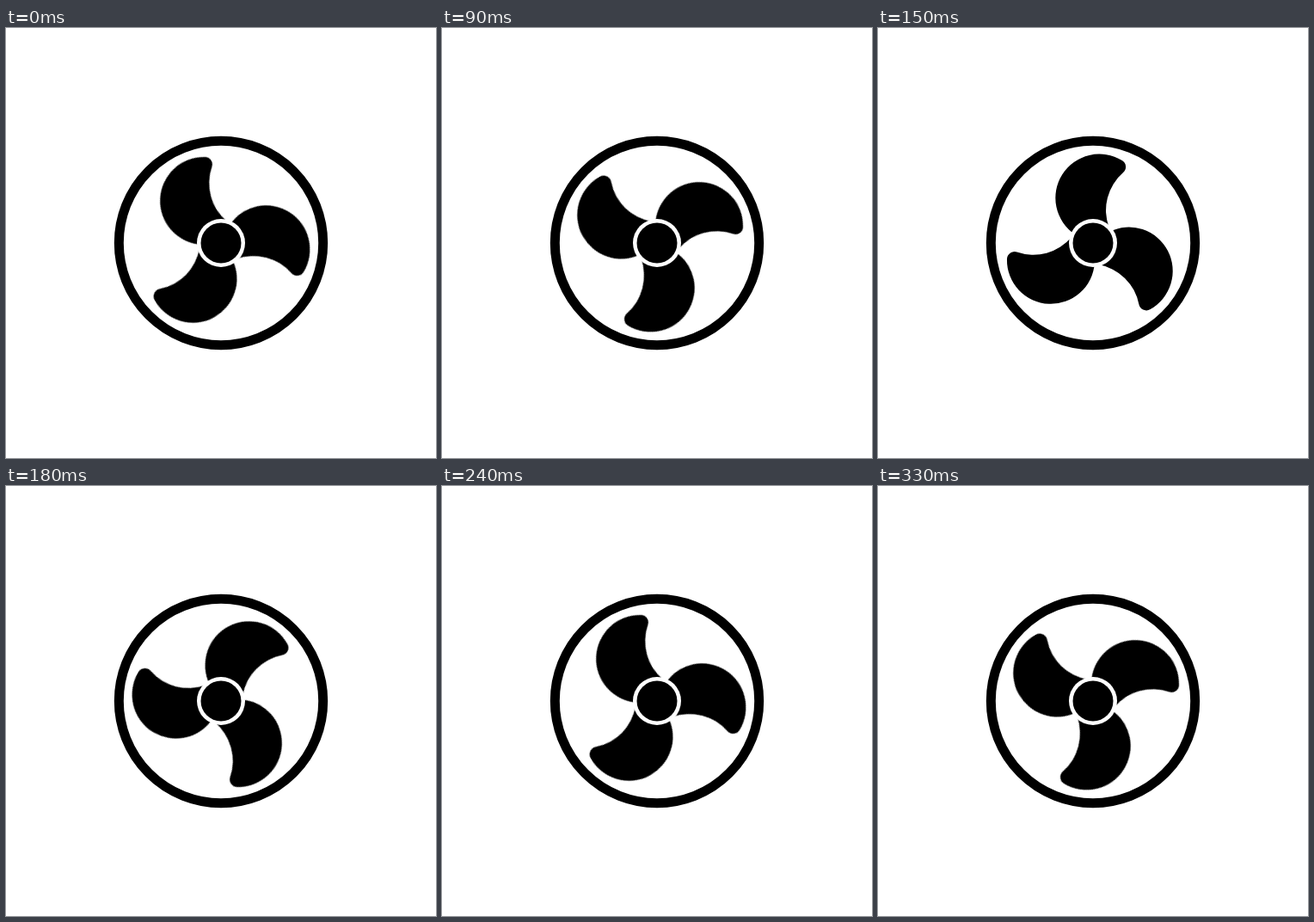
Write an HTML page that moves like this. It is 500 px wide and 500 px high and loops after 0.36 s.

```html
<!DOCTYPE html>
<html lang="en">
<head>
<meta charset="utf-8">
<title>Fan</title>
<style>
  html, body { margin: 0; width: 100%; height: 100%; overflow: hidden; background: #fff; }
  svg { display: block; width: 100%; height: 100%; }
  /* Three-fold symmetry: a third of a turn in four hard steps looks like endless spin. */
  .blades { transform-origin: 0 0; animation: spin 120ms steps(4, end) infinite; }
  @keyframes spin {
    from { transform: rotate(-30deg); }
    to { transform: rotate(90deg); }
  }
</style>
</head>
<body>
<svg viewBox="-250 -250 500 500">
  <defs>
    <path id="blade" d="M-21 -10A51 51 0 0 1 33.8 -96A8.7 8.7 0 0 1 35.1 -81.9A58 58 0 0 0 18.6 -18Z"/>
  </defs>
  <circle r="118.7" fill="none" stroke="#000" stroke-width="11"/>
  <g class="blades">
    <use href="#blade"/>
    <use href="#blade" transform="rotate(120)"/>
    <use href="#blade" transform="rotate(240)"/>
  </g>
  <circle r="28" fill="#fff"/>
  <circle r="23.5"/>
</svg>
</body>
</html>
```
